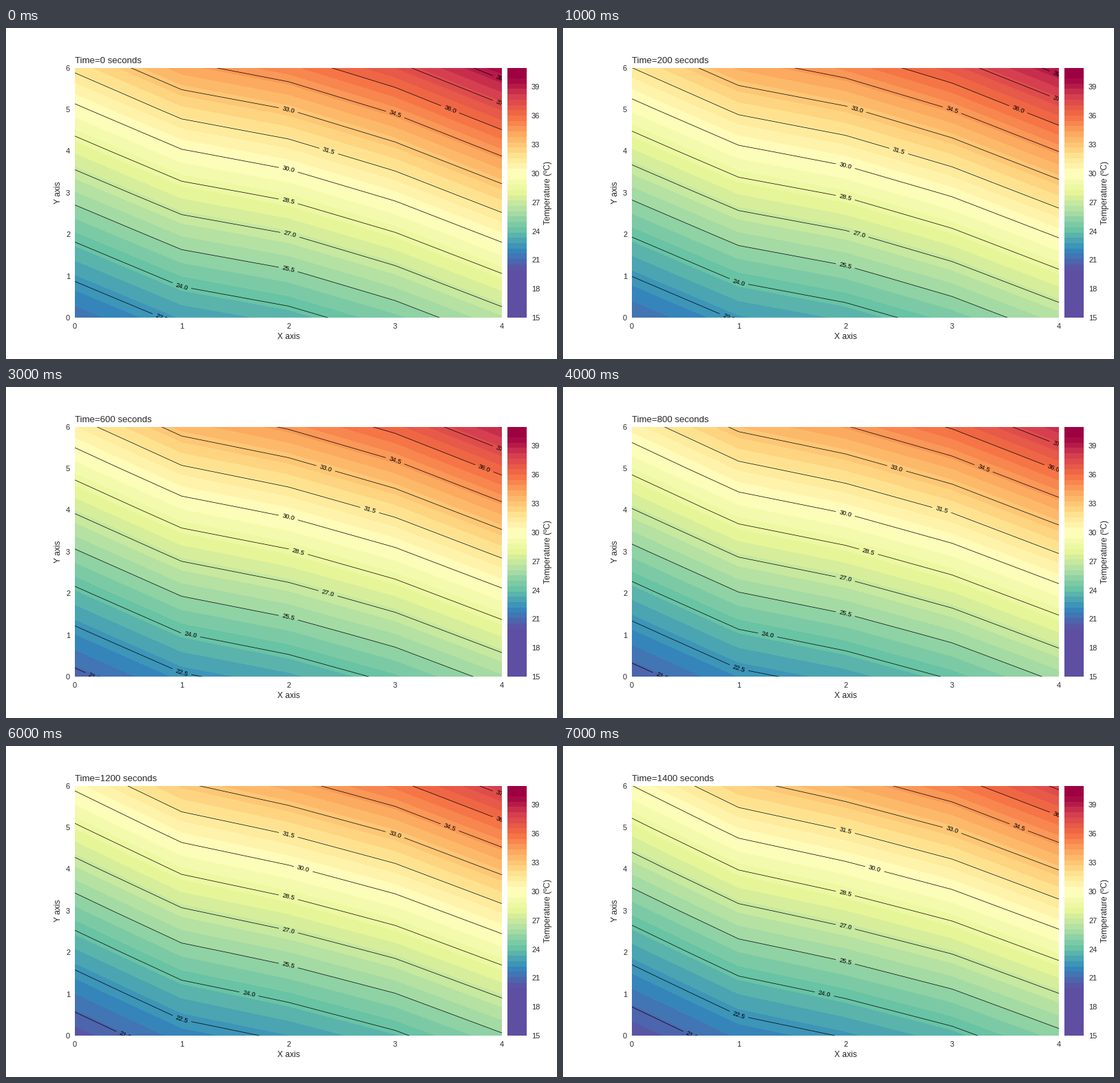
Recreate the animation shown at these times as a matplotlib script. Size 800 by 480 pixels, loop 8000 ms.

```python
import numpy as np
import matplotlib.pyplot as plt
from matplotlib.animation import FuncAnimation

W, H, DPI = 800, 480, 100
INK = "#262626"
STEPS, STEP_SECONDS = 8, 200


def px(n):
    """Pixels to points."""
    return n * 72 / DPI


plt.rcParams.update({
    "font.family": "Liberation Sans",
    "text.color": INK,
    "axes.labelcolor": INK,
    "xtick.color": INK,
    "ytick.color": INK,
})

# Each column starts at its own temperature, rises with y and cools steadily.
base = np.array([21.2, 22.8, 23.54, 24.785, 26.51])
cooling = np.array([0.168, 0.149, 0.137, 0.166, 0.188])
xs, ys = np.arange(5), np.arange(7)
rise = (1 + 0.0681 * ys + 0.00247 * ys ** 2)[:, None]

fills = np.linspace(15, 41, 48)
lines = np.arange(15, 41, 1.5)
shade = dict(cmap="Spectral_r", vmin=20, vmax=40)

fig = plt.figure(figsize=(W / DPI, H / DPI), dpi=DPI, facecolor="white")


def add_axes(left, top, right, bottom):
    return fig.add_axes([left / W, 1 - bottom / H, (right - left) / W, (bottom - top) / H])


def plain(ax):
    """Hide the frame and the tick marks."""
    for spine in ax.spines.values():
        spine.set_visible(False)
    ax.tick_params(length=0, pad=px(7), labelsize=px(11))
    ax.tick_params(axis="x", pad=px(7.7))


ax = add_axes(100, 57.6, 720, 420)
bar = add_axes(728, 57.6, 756, 420)

mids = (fills[:-1] + fills[1:]) / 2
bar.pcolormesh([0, 1], fills, mids[:, None], **shade)
plain(bar)
bar.set_xticks([])
bar.set_yticks(np.arange(15, 41, 3))
bar.set_ylim(15, 41)
bar.yaxis.tick_right()
bar.yaxis.set_label_position("right")
bar.set_ylabel("Temperature (ºC)", fontsize=px(12), labelpad=px(5.3))


def draw(n):
    ax.clear()
    plain(ax)
    ax.set(xlim=(0, 4), ylim=(0, 6), xticks=xs, yticks=ys)
    ax.set_xlabel("X axis", fontsize=px(12), labelpad=px(4.3))
    ax.set_ylabel("Y axis", fontsize=px(12), labelpad=px(5))
    ax.set_title(f"Time={n * STEP_SECONDS} seconds", loc="left",
                 fontsize=px(13.2), pad=px(7))
    temp = (base - n * cooling) * rise
    ax.contourf(xs, ys, temp, levels=fills, **shade)
    iso = ax.contour(xs, ys, temp, levels=lines, colors="k", linewidths=px(0.7))
    ax.clabel(iso, fmt="%.1f", fontsize=px(9.5), inline=True)
    return []


anim = FuncAnimation(fig, draw, frames=STEPS, interval=1000,
                     init_func=lambda: draw(0), repeat=True, repeat_delay=0)
plt.show()
```
